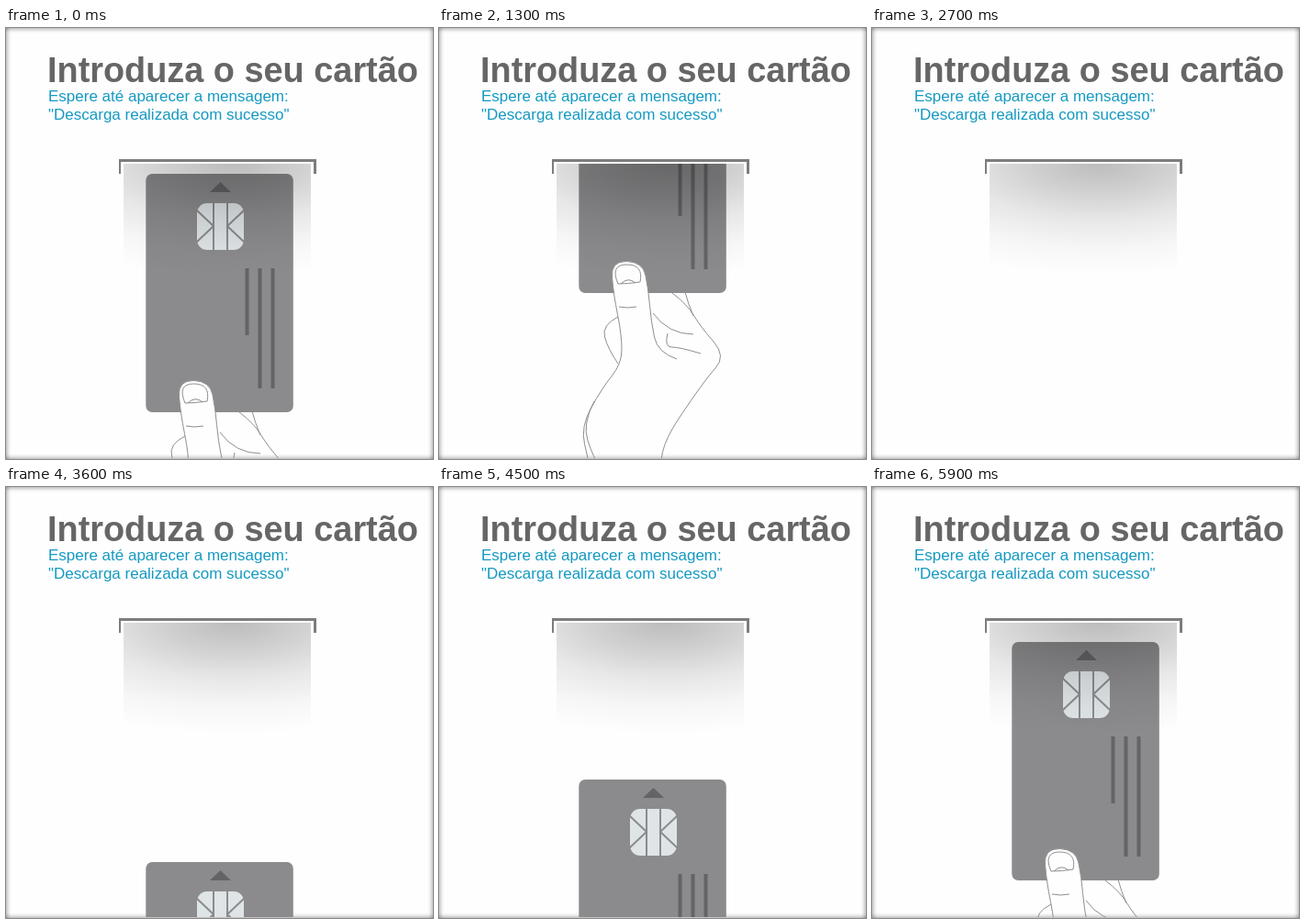
These frames come from a looping animation (465 by 470 pixels, 6000 ms). An HTML page with a canvas:

```html
<!DOCTYPE html>
<html lang="pt">
<head>
<meta charset="utf-8">
<title>Introduza o seu cartão</title>
<style>
html, body { margin: 0; width: 100%; height: 100%; overflow: hidden; background: #fefefe; }
canvas { display: block; }
</style>
</head>
<body>
<canvas id="stage" width="465" height="470"></canvas>
<script>
const W = 465, H = 470, STEP = 100, STEPS = 60;
const CARD = '#8b8b8d', DARK = '#646466', LINE = '#8e8e8e', PAPER = '#fefefe';
const ctx = document.getElementById('stage').getContext('2d');

// Smooth stroke guided by a few control points
function soft(...p) {
  const path = new Path2D(), last = p.length - 2;
  path.moveTo(p[0], p[1]);
  for (let i = 2; i < last; i += 2) {
    const t = i + 2 < last ? 0.5 : 1;
    path.quadraticCurveTo(p[i], p[i + 1],
      p[i] + (p[i + 2] - p[i]) * t, p[i + 1] + (p[i + 3] - p[i + 1]) * t);
  }
  return path;
}

// Hand, placed relative to a card whose top is at y = -51
const HAND_TOP = -51, CARD_END = 209;
const thumb = soft(176, 520, 172, 440, 163, 392, 154, 355, 178, 312, 199, 286, 199, 255,
  190, 210, 187, 174, 222, 175, 228, 205, 231, 240, 238, 274, 259, 281);
const palm = soft(254, 209, 270, 221, 285, 246, 313, 278, 289, 304, 233, 388, 260, 430, 271, 469, 285, 520);
const wrist = soft(169, 327, 156, 352, 168, 388, 180, 406, 185, 446);
const finger = soft(195, 235, 177, 244, 184, 270, 195, 286);
const nail = soft(195, 199, 186, 178, 223, 178, 219, 197);
const nailBase = soft(195, 199, 206, 199, 219, 197);
const moon = soft(198, 199, 206, 191, 214, 198);
const knuckle = soft(196, 224, 205, 226, 215, 224);
const foldTop = soft(268, 208, 271, 220, 277, 234);
const foldSide = soft(233, 231, 250, 254, 277, 254);
const foldLow = soft(249, 253, 245, 268, 262, 268, 285, 275);
const hand = [thumb, palm, wrist, finger, nail, nailBase, moon, knuckle, foldTop, foldSide, foldLow];

function rect(color, x, y, w, h) {
  ctx.fillStyle = color;
  ctx.fillRect(x, y, w, h);
}

function round(color, x, y, w, h, r) {
  ctx.fillStyle = color;
  ctx.beginPath();
  ctx.roundRect(x, y, w, h, r);
  ctx.fill();
}

function clip(top, bottom) {
  ctx.beginPath();
  ctx.rect(0, top, W, bottom - top);
  ctx.clip();
}

function clipped(top, dy, draw) {
  ctx.save();
  clip(top, H - 1);
  ctx.translate(0, dy);
  draw();
  ctx.restore();
}

function shadow(gradient, stops) {
  stops.forEach(([at, alpha]) => gradient.addColorStop(at, `rgba(0,0,0,${alpha})`));
  return gradient;
}

function drawFrame() {
  const b = 6, stops = [[0, .26], [.35, .12], [.7, .03], [1, 0]];
  const edge = (...line) => shadow(ctx.createLinearGradient(...line), stops);
  rect(PAPER, 0, 0, W, H);
  rect(edge(0, 0, b, 0), 0, 0, b, H);
  rect(edge(W, 0, W - b, 0), W - b, 0, b, H);
  rect(edge(0, 0, 0, b), 0, 0, W, b);
  rect(edge(0, H, 0, H - b), 0, H - b, W, b);
}

function drawText() {
  const put = (text, font, color, x, y) => {
    ctx.font = font + ' "Liberation Sans", Arial, sans-serif';
    ctx.fillStyle = color;
    ctx.fillText(text, x, y);
  };
  put('Introduza o seu cartão', 'bold 37.87px', '#666666', 45, 59);
  put('Espere até aparecer a mensagem:', '17px', '#1499c2', 46, 80);
  put('"Descarga realizada com sucesso"', '17px', '#1499c2', 46, 100);
}

function drawSlot() {
  const c = '#7b7e7c';
  rect(c, 123, 143, 215, 3);
  rect(c, 123, 143, 2, 16);
  rect(c, 335, 143, 3, 16);
}

// Soft shadow falling out of the slot, wider than it is tall
function drawShade() {
  const g = ctx.createRadialGradient(0, 0, 0, 0, 0, 122);
  ctx.save();
  ctx.translate(247, 148);
  ctx.scale(2.5, 1);
  rect(shadow(g, [[0, .26], [.25, .18], [.5, .09], [.75, .03], [1, 0]]), -119 / 2.5, 0, 204 / 2.5, 122);
  ctx.restore();
}

function drawCard() {
  round(CARD, 152.3, 0, 160.5, 260, 7);
  ctx.fillStyle = DARK;
  ctx.beginPath();
  ctx.moveTo(222, 20);
  ctx.lineTo(233.5, 9);
  ctx.lineTo(245, 20);
  ctx.fill();

  round('#dfe4e7', 208, 32, 51, 51, 11);
  ctx.strokeStyle = CARD;
  ctx.lineWidth = 2;
  ctx.beginPath();
  for (const [x, edge] of [[226, 207], [241, 260]]) {
    ctx.moveTo(x, 32);
    ctx.lineTo(x, 83);
    ctx.moveTo(edge, 39);
    ctx.lineTo(x, 57);
    ctx.lineTo(edge, 75);
  }
  ctx.stroke();

  for (let i = 0; i < 3; i++) rect(DARK, 260.5 + 14 * i, 103, 4, i ? 131 : 73);
}

// Only the part of the thumb that lies on the card is opaque
function drawHand() {
  ctx.strokeStyle = LINE;
  ctx.lineWidth = 1;
  hand.forEach(p => ctx.stroke(p));
  clip(0, CARD_END);
  ctx.fillStyle = PAPER;
  ctx.fill(thumb);
  [thumb, nail, nailBase, moon].forEach(p => ctx.stroke(p));
}

// Top of the card at a step, or null while it is out of sight
function cardTop(s) {
  if (s < 27) return Math.round(159 - 10.03 * s);
  if (s < 32) return null;
  return s < 49 ? 449 - 10 * (s - 32) : 159 + 10 * (STEPS - s);
}

function render(ms) {
  const y = cardTop(Math.floor(ms / STEP) % STEPS);
  drawFrame();
  drawText();
  drawSlot();
  if (y !== null) clipped(148, y, drawCard);
  drawShade();
  if (y !== null) clipped(143, y - HAND_TOP, drawHand);
}

const start = performance.now();
function tick() {
  render(performance.now() - start);
  requestAnimationFrame(tick);
}
tick();
</script>
</body>
</html>
```
